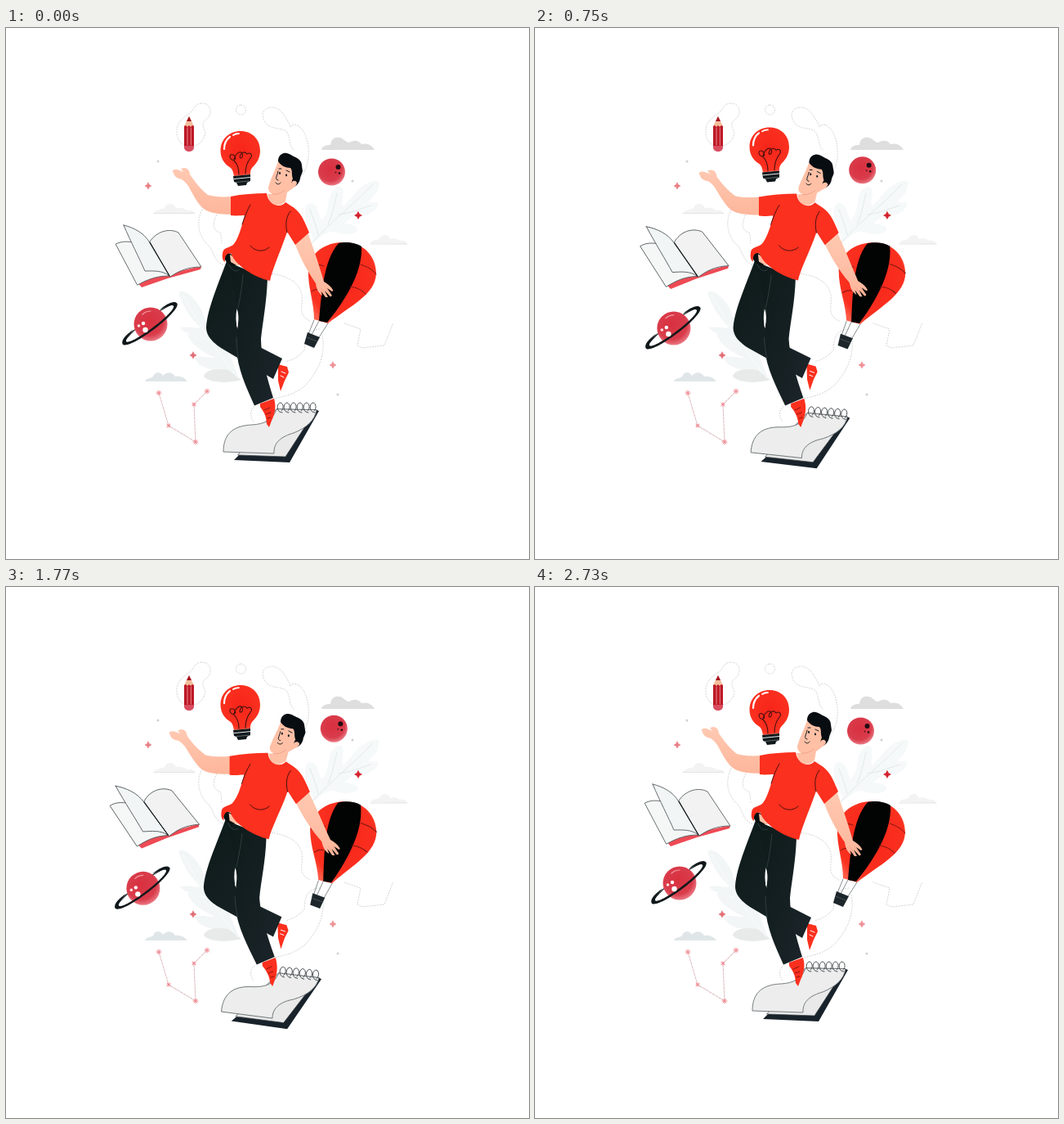
Write an HTML page that moves like this. It is 640 px wide and 649 px high and loops after 2.76 s.

```html
<!DOCTYPE html>
<html lang="en">
<head>
<meta charset="utf-8">
<title>Floating ideas</title>
<style>
html, body { margin: 0; width: 100%; height: 100%; overflow: hidden; background: #fff; }
svg { display: block; width: 100%; height: 100%; }
path { stroke-linecap: round; stroke-linejoin: round; }
</style>
</head>
<body>
<svg id="stage" viewBox="0 0 640 649">
  <defs>
    <radialGradient id="ball" cx=".45" cy=".4" r=".62">
      <stop offset="0" stop-color="#d9303f"/><stop offset=".7" stop-color="#d93c4b"/><stop offset="1" stop-color="#ec7f8a"/>
    </radialGradient>
    <radialGradient id="glow" cx=".5" cy=".45" r=".6">
      <stop offset="0" stop-color="#f7251a"/><stop offset=".8" stop-color="#fa301f"/><stop offset="1" stop-color="#fd5c48"/>
    </radialGradient>
    <linearGradient id="cloth" x1="0" y1="0" x2="1" y2="1">
      <stop offset="0" stop-color="#0d1a19"/><stop offset="1" stop-color="#1b2429"/>
    </linearGradient>
    <linearGradient id="skin" x1="0" y1="0" x2="0" y2="1">
      <stop offset="0" stop-color="#ffc9b2"/><stop offset="1" stop-color="#fdb69b"/>
    </linearGradient>
  </defs>
</svg>
<script>
const NS = 'http://www.w3.org/2000/svg';
const stage = document.getElementById('stage');
const INK = '#10181b', RED = '#fb301e', SKIN = '#ffc0a6', STEP = 30, FRAMES = 92;

function add(parent, tag, attrs) {
  const el = document.createElementNS(NS, tag);
  for (const key in attrs) el.setAttribute(key, attrs[key]);
  return parent.appendChild(el);
}
const group = () => add(stage, 'g', {});
const fill = (g, d, color, stroke = 'none', w = 1) =>
  add(g, 'path', { d, fill: color, stroke, 'stroke-width': w });
const line = (g, d, color = INK, w = 1) => fill(g, d, 'none', color, w);
const disc = (g, cx, cy, r, color) => add(g, 'circle', { cx, cy, r, fill: color });
const dots = (g, d) => line(g, d, '#cfcfcf', .9).setAttribute('stroke-dasharray', '1.2 2');

function star(g, x, y, r, color) {
  const k = r * .36;
  fill(g, `M${x} ${y - r}L${x + k} ${y - k}L${x + r} ${y}L${x + k} ${y + k}L${x} ${y + r}` +
    `L${x - k} ${y + k}L${x - r} ${y}L${x - k} ${y - k}Z`, color, color, .6);
}

// Backdrop
const back = group();
dots(back, 'M240 92C251 92 253 104 246 111C238 116 241 120 244 128C242 140 233 145 224 145C213 144 208 134 209 124C210 112 222 107 228 101C231 96 233 92 240 92Z');
dots(back, 'M287.500 94A6 6 0 1 1 287.400 94Z');
dots(back, 'M348 120C342 108 336 97 325 97C314 98 312 106 316 113C321 124 331 121 341 125C348 128 346 146 353 150M348 121C353 114 363 121 367 133C373 150 371 170 360 183');
dots(back, 'M240 222C231 240 238 256 246 264C255 271 252 284 267 290M261 223C251 238 253 248 262 250C264 254 263 258 264 263');
dots(back, 'M322 300C343 302 359 310 362 326C364 340 356 350 372 358M384 368C366 369 366 382 365 394C356 404 348 406 342 408M387 376C392 400 381 421 366 437C350 451 332 451 317 456C298 461 296 474 304 482');
dots(back, 'M414 361L434 368L430 388L436 391L463 388L474 360');

fill(back, 'M386 149C387 144 392 143 397 143C398 135 403 133 408 134C413 134 415 140 420 140C427 136 432 138 435 142C443 140 448 144 451 149Z', '#dedede');
fill(back, 'M181 226C185 221 190 222 194 220C197 213 205 214 208 220C215 219 219 221 222 223C227 222 230 224 231 226Z', '#f3f3f3');
fill(back, 'M446 263C449 258 453 260 457 258C460 251 468 252 470 258C476 256 480 259 482 260C487 259 490 261 491 264Z', '#f3f3f3');
fill(back, 'M170 432C172 427 177 429 180 426C182 420 189 419 192 425C197 420 203 420 207 426C214 425 219 428 222 432Z', '#e0e6e8');
line(back, 'M181 226.500L231 226.500M446 264L491 264', '#dcdcdc', .8);

fill(back, 'M375 263C377 250 367 243 366 230C365 221 367 214 372 214C381 214 382 226 386 235C395 226 393 217 396 207C399 196 407 192 411 195C415 200 410 211 412 218C423 209 427 198 438 192C446 187 454 185 457 188C456 198 453 203 447 209C442 213 444 214 455 213C457 219 447 230 432 230C422 231 418 235 414 239C424 239 432 243 430 248C418 257 406 249 398 249C388 250 382 259 375 263Z', '#f6f9f9');
line(back, 'M374 263C394 240 422 219 449 191M394 240C401 225 402 213 405 202M382 253C380 241 375 231 372 222M407 228C422 226 434 221 446 217', '#dce4e6', .8);
fill(back, 'M211 323C218 318 231 329 239 344C243 353 244 361 251 365L270 390L286 430C268 435 250 434 242 427C245 420 257 421 262 418C247 418 234 413 231 403C239 400 249 404 256 403C243 397 226 388 222 374C232 373 241 380 246 380C235 375 218 375 213 366C221 364 233 368 238 366C227 356 217 342 211 323Z', '#f2f6f6');
fill(back, 'M242 425C246 416 262 416 272 418L288 430C271 435 247 433 242 425Z', '#e8eaea');
line(back, 'M216 327C235 360 257 395 284 428', '#fafcfc', 1);

star(back, 174, 193, 4, '#e98287');
star(back, 431, 229, 4.4, '#d3202a');
star(back, 229, 400, 4, '#e27077');
star(back, 400, 412, 4, '#ee9298');
for (const [x, y] of [[186, 163], [424, 187], [406, 448]]) disc(back, x, y, 1.5, '#d0d0d0');
const nodes = [[187, 446], [199, 486], [232, 506], [230, 460], [246, 444]];
line(back, 'M' + nodes.map(p => p.join(' ')).join('L'), '#dfc0c4', 1.1).setAttribute('stroke-dasharray', '3 1.5');
nodes.forEach(([x, y], i) => {
  const r = i % 2 ? 2 : 3;
  line(back, `M${x - r} ${y}L${x + r} ${y}M${x} ${y - r}L${x} ${y + r}M${x - 2} ${y - 2}L${x + 2} ${y + 2}M${x - 2} ${y + 2}L${x + 2} ${y - 2}`, '#ee8a92', 1);
});

fill(back, 'M218 143L230 143L230 146C230 149 227 151 224 151C221 151 218 149 218 146Z', '#d94c5e');
fill(back, 'M218 120L224 108L230 120L230 144L218 144Z', '#f2bd9b');
fill(back, 'M221 114L224 108L227 114Z', '#a51520');
fill(back, 'M218 120L220 119L222 121L224 119L226 121L228 119L230 120L230 144L218 144Z', '#bd1927');
line(back, 'M222 122L222 143M226.300 122L226.300 143', '#f3a5a5', .8);

// Ball, bulb and planet only slide
const ball = group();
disc(ball, 398.5, 176, 16.5, 'url(#ball)');
disc(ball, 406.5, 170, 3, '#210d12');
disc(ball, 408, 177.5, 1.3, '#210d12');
disc(ball, 403.5, 176.5, 1, '#5d1520');

const bulb = group();
fill(bulb, 'M262.500 150C262.500 136 273 126 287 126C301 126 311 136 311 150C311 160 306 166 301 171C299 174 299 176 299 179L279 181C278 177 278 174 275 171C268 167 262.500 160 262.500 150Z', 'url(#glow)');
line(bulb, 'M285 179C285 171 282 165 279 162C272 160 273 153 278 155C282 157 281 161 279 161C281 153 286 150 289 153C291 156 288 161 286 158C287 152 292 150 295 154C300 151 302 156 299 159C296 163 293 169 293 178', '#47110f', 1.1);
line(bulb, 'M267 148C267 141 270 136 274 133', '#ffffff', 2.2);
line(bulb, 'M278 131C280 129.500 283 129 285 129', '#ffffff', 1.8);
fill(bulb, 'M278 181L299 179L299 187L295 189L294 192L284 193L282 189L279 188Z', INK);
line(bulb, 'M279 184.500L299 182.500', '#e9eeee', 1);
line(bulb, 'M282 188.500L298 187', '#7d888a', .7);

const planet = group();
const tilted = () => add(planet, 'g', { transform: 'translate(176.5 362) rotate(-37)' });
line(tilted(), 'M-40 0C-36 -9 36 -9 40 0', INK, 1.2);
disc(planet, 177, 362, 20.5, 'url(#ball)');
fill(tilted(), 'M-41.500 0C-42 -6 -30 -8 -20 -7C-30 -5 -37 -3 -36 0C-31 7 31 7 36 0C37 -3 30 -5 20 -7C30 -8 42 -6 41.500 0C37 10.500 -37 10.500 -41.500 0Z', INK);
disc(planet, 168, 361, 2.2, '#fff');
disc(planet, 170.5, 369, 3.2, '#fff');
disc(planet, 162.5, 364, 1.8, '#ffe2e2');
line(planet, 'M167 350C170 347 174 346 177 346', '#f39aa0', 1.2);

// Book, notebook and balloon tilt
const book = group();
fill(book, 'M161 311L166 317L198 306L238 295L239 291L200 300Z', '#ee4a54');
fill(book, 'M134.500 264C142 260 149 261 156 262L200 303C184 303 174 307 161 314Z', '#f5f7f7', '#565d5f', .9);
fill(book, 'M176 261C184 249 199 244 211 250L239 292C221 292 210 298 201 304Z', '#f2f2f2', '#565d5f', .9);
fill(book, 'M144 241C157 244 169 251 175 261L200 303C191 296 181 297 170 297C163 281 153 262 144 241Z', '#f1f5f5', '#565d5f', .9);
line(book, 'M176 262L200 303', INK, 1.1);

const pad = group();
fill(pad, 'M279 528L285 522L341 522L378 466L383 468L347 531Z', '#18222a');
fill(pad, 'M331 466L379 467L342 524L284 522Z', '#e9e9e9', '#394043', .7);
fill(pad, 'M331 466C326 480 316 484 301 485C276 486 266 498 266 518L328 520C327 506 338 499 352 495C369 488 378 479 380 467Z', '#ededed', '#6a7174', .9);
for (let i = 0; i < 6; i++) {
  const x = 335 + i * 8;
  line(pad, `M${x + 3} 470C${x - 5} 470 ${x - 4} 458 ${x + 1} 458C${x + 5} 459 ${x + 5} 466 ${x + 2} 468`, '#3a4245', .9);
}

const balloon = group();
fill(balloon, 'M413 262C440 262 453 281 453 300C452 326 422 339 394 361L377 356C377 335 369 316 370 295C372 275 390 262 413 262Z', 'url(#glow)');
fill(balloon, 'M407 263C415 261 428 262 435 267C437 301 411 338 393 360L383 358C386 328 388 284 407 263Z', '#020303');
line(balloon, 'M371 294C378 288 384 289 389 291M374 322C378 319 382 319 385 320M434 289C442 292 449 295 453 301M421 316C429 317 435 320 440 325', '#7c1613', 1);
line(balloon, 'M377 357L370 374M394 361L383 378M383 358L374 375', '#697073', .8);
fill(balloon, 'M369 372L384 378L377 391L365 386Z', '#1c262b');
line(balloon, 'M368 378L380 383', '#556065', .7);

// Man
const man = group();
fill(man, 'M333 411L344 414L346 421L341 431L336 444L333 431Z', RED);
line(man, 'M337 420L342 422M336 425L340 427', '#fff', 1);
fill(man, 'M270 285C259 315 246 344 245 366C245 377 254 385 263 391L327 429L338 404L289 379L282 364L284 345L300 300Z', 'url(#cloth)');
fill(man, 'M311 459L328 453C331 463 329 472 325 480L322 488L319 484C319 475 315 468 311 463Z', RED);
line(man, 'M316 467L323 464M318 472L324 470M320 477L324 476', '#7e1512', .9);
fill(man, 'M271 286L320 306C319 336 314 360 312 380C312 402 320 429 327 452L304 461.500C294 439 283 416 282 391C283 375 284 358 284 342Z', 'url(#cloth)');
line(man, 'M284 342C287 327 289 314 290 302M282 378C282 386 283 395 284 404M273 289C276 297 281 298 285 296', '#3b4a4c', .7);
fill(man, 'M282.500 343C285 350 285 358 283 366C281 359 281 351 282.500 343Z', '#fff');

fill(man, 'M276 206C263 207 254 206 247 204C237 196 230 186 225 179C225 174 222 171 218 171L214 172L217 176L210 173C206 172 202 174 205 177C206 182 210 184 215 185C219 188 221 190 223 193C230 206 237 219 245 223C253 227 265 228 277 228Z', 'url(#skin)');
fill(man, 'M369 249C377 272 384 292 389 310C394 313 398 316 400.500 321L399 322L393 318L399 327L397 328.500L390 321L394 329L391 329L385 321L387 327C381 323 380 318 379 312C368 296 359 279 353 262Z', 'url(#skin)');
line(man, 'M391 317L396 325M386 318L391 326', '#e9947e', .6);

fill(man, 'M333 163C329 175 323 186 321 195C321 201 325 204 332 202L320 203C322 216 333 221 342 212L344 201L356 192L355 171Z', SKIN);
fill(man, 'M266 274C273 273 281 279 285 288L278 291C271 288 266 284 266 274Z', '#07100f');
fill(man, 'M274 277L287 284L284 291L275 286Z', SKIN);
fill(man, 'M319 202C304 202 289 203 275 206L275 229C282 230 287 229 292 229C288 245 284 258 278 265C273 269 265 268 265 276C264 282 266 285 268 286C267 278 271 274 276 276C279 289 304 305 323 309C326 294 338 268 344 249L354 265L371 250C366 238 362 228 355 222C351 218 346 216 342 213C336 221 321 217 319 202Z', RED);
line(man, 'M299 266C305 274 316 274 322 268M299 216C295 223 292 231 289 240M344 250C342 242 342 231 348 224', '#4a1111', 1);

fill(man, 'M333 163C333 157 336 154 340 153C345 152 348 155 352 157C357 159 362 162 362 168L363 175C362 179 360 181 360 184C359 189 356 193 352 194C349 192 349 188 351 184C349 179 351 174 348 171C342 171 336 168 333 163Z', '#080d12');
fill(man, 'M350 188C353 185 358 188 355 192C353 195 350 196 348 193Z', SKIN);
line(man, 'M334 172L337 172M343 174L347 176M333 175C332 181 328 185 333 186M330 189C332 192 335 191 336 189', INK, 1);
line(man, 'M335 177L335.100 177.800M343 179.500L343.100 180.300', INK, 2);
line(man, 'M326 203C332 204 338 201 341 198', '#ef9c85', .8);

// Bend pins for the man: x, y, dx, dy
const pins = [
  [347, 155, 5, 3], [360, 180, 5, 4], [334, 180, 4, 2.5], [329, 201, 2.5, 1], [331, 214, .5, 0],
  [204, 175, -6, 5], [222, 185, -5, 4], [244, 217, -4, 2], [275, 215, -2, 1],
  [318, 245, 0, 0], [353, 222, .5, .5], [362, 256, 1, .5], [375, 285, 7, 0], [392, 320, 12, -1.5],
  [267, 275, -2, -1], [322, 308, -2, -1], [245, 367, -4.5, 1], [283, 350, -3, 0], [315, 365, -3, 0],
  [335, 416, -1, -1], [337, 436, 0, -3], [304, 461, 4, 0], [327, 453, 2.5, 0], [321, 486, 6, 0]
];
const shift = (x, y) => {
  let sum = 0, dx = 0, dy = 0;
  for (const [px, py, a, b] of pins) {
    const w = 1 / ((x - px) ** 2 + (y - py) ** 2 + 12) ** 1.5;
    sum += w; dx += w * a; dy += w * b;
  }
  return [dx / sum, dy / sum];
};
const limbs = [...man.querySelectorAll('path')].map(el => ({
  el,
  parts: el.getAttribute('d').match(/[A-Z]|[\d.]+ [\d.]+/g).map(s => {
    if (/[A-Z]/.test(s)) return s;
    const [x, y] = s.split(' ').map(Number);
    return [x, y, ...shift(x, y)];
  })
}));

// Three anchors (x, y, dx, dy) define each tilt
const tilts = [
  [book, [[134.5, 264, -10, 4.5], [239, 292, -3.5, -2.5], [161, 314, -.5, 4]]],
  [pad, [[266, 518, -3.5, 1.5], [346, 530, -4, 13], [381, 466, 4.5, 15.5]]],
  [balloon, [[413, 262, -1, .5], [453, 300, .5, -2], [374, 381, 9.5, 3]]]
];
const slides = [[ball, 4, -4], [bulb, 0, -8.4], [planet, -13, 9]];

function affine([p, q, r], u) {
  const [x1, y1, x2, y2] = [q[0] - p[0], q[1] - p[1], r[0] - p[0], r[1] - p[1]];
  const det = x1 * y2 - x2 * y1;
  const row = k => {
    const [a, b] = [(q[k] - p[k]) * u, (r[k] - p[k]) * u];
    return [(a * y2 - b * y1) / det, (b * x1 - a * x2) / det];
  };
  const [a, c] = row(2), [b, d] = row(3);
  const e = p[2] * u - a * p[0] - c * p[1], f = p[3] * u - b * p[0] - d * p[1];
  return `matrix(${[1 + a, b, c, 1 + d, e, f].join(' ')})`;
}

function draw(ms) {
  const n = Math.floor(ms / STEP) % FRAMES;
  const u = Math.min(n, FRAMES - 1 - n) / ((FRAMES - 1) / 2);
  for (const [g, x, y] of slides) g.setAttribute('transform', `translate(${x * u} ${y * u})`);
  for (const [g, anchors] of tilts) g.setAttribute('transform', affine(anchors, u));
  for (const { el, parts } of limbs) {
    el.setAttribute('d', parts.map(p => typeof p === 'string' ? p
      : `${(p[0] + p[2] * u).toFixed(2)} ${(p[1] + p[3] * u).toFixed(2)}`).join(' '));
  }
}

let start;
function tick(now) {
  start ??= now;
  draw(now - start);
  requestAnimationFrame(tick);
}
draw(0);
requestAnimationFrame(tick);
</script>
</body>
</html>
```
